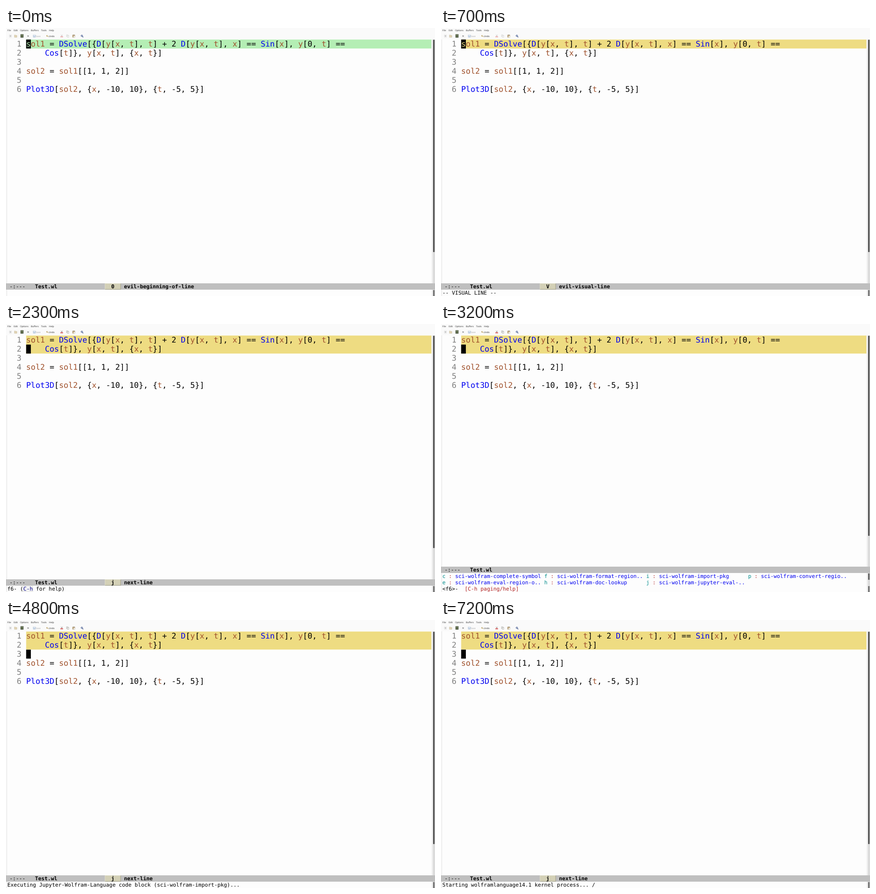
Animation of 947 by 592 pixels, one loop 8000 ms. Source, as an HTML page:

```html
<!DOCTYPE html>
<html lang="en">
<head>
<meta charset="utf-8">
<title>Editor session</title>
<style>
html, body { margin: 0; width: 100%; height: 100%; overflow: hidden; background: #fdfdfd; }
svg { display: block; width: 947px; height: 592px; }
text { white-space: pre; text-rendering: geometricPrecision; }
.code { font: 17.19px "DejaVu Sans Mono", monospace; }
.small { font: 11.68px "DejaVu Sans Mono", monospace; }
.menu { font: 5px "Noto Sans", sans-serif; }
.bold { font-weight: bold; }
</style>
</head>
<body>
<svg id="stage" viewBox="0 0 947 592"></svg>
<script>
const LOOP = 8000;
const CELL = 10.35, LEFT = 44.5, ROW = 20;
const SMALL = 7.032;
const BLUE = '#0000f0', BROWN = '#a0522d', TEAL = '#008b8b', RED = '#b22222';
const GREEN = '#b4eeb4', GOLD = '#eedc82';

const stage = document.getElementById('stage');

function add(parent, tag, attrs, content) {
  const el = document.createElementNS('http://www.w3.org/2000/svg', tag);
  for (const key in attrs) el.setAttribute(key, attrs[key]);
  if (content !== undefined) el.textContent = content;
  parent.appendChild(el);
  return el;
}
const group = (parent = stage) => add(parent, 'g', {});
const rect = (parent, x, y, width, height, fill, more) =>
  add(parent, 'rect', { x, y, width, height, fill, ...more });
const path = (parent, d, stroke, width = 1, fill = 'none') =>
  add(parent, 'path', { d, stroke, 'stroke-width': width, fill });
const label = (parent, cls, x, y, content, fill = '#000') =>
  add(parent, 'text', { class: cls, x, y, fill }, content);
const show = (el, on) => el.setAttribute('display', on ? 'inline' : 'none');

// Coloured runs of monospaced text: [string, colour]
function runs(parent, cls, x, y, parts) {
  const text = add(parent, 'text', { class: cls, x, y });
  for (const [str, fill] of parts) add(text, 'tspan', { fill: fill || '#000' }, str);
}

// Window frame
rect(stage, 0, 0, 947, 592, '#fdfdfd');
rect(stage, 0, 0, 947, 25, '#fafafa');
rect(stage, 0, 25, 3, 567, '#f2f2f2');
rect(stage, 939, 25, 3, 567, '#f3f3f3');
rect(stage, 942, 25, 5, 567, '#dcdcdc');

const menus = { File: 3, Edit: 17, Options: 31, Buffers: 55, Tools: 77.5, Help: 95 };
for (const name in menus) label(stage, 'menu', menus[name], 7, name, '#333');

// Toolbar
rect(stage, 7.8, 15.2, 4, 5.4, '#fff', { stroke: '#bbb', 'stroke-width': .5 });
path(stage, 'M9.8 16.6v2.4M8.6 17.8h2.4', '#777', .7);
path(stage, 'M18.7 15.4h2l.6.8h2.8v4.4h-5.4z', '#b9a882', .5, '#e3d5b6');
rect(stage, 32, 13.8, 6.6, 7.4, '#46513f', { rx: .5 });
rect(stage, 33, 14.8, 4.6, 1.5, '#8c9a70');
rect(stage, 33, 17.2, 4.6, 2.8, '#65734f');
path(stage, 'M47.2 16.2l3 3.2M50.2 16.2l-3 3.2', '#555', .9);
rect(stage, 60, 15.3, 5, 5, '#c4d3e6', { stroke: '#9fb2cb', 'stroke-width': .5 });
rect(stage, 61.2, 15.6, 2.6, 1.8, '#f4f7fb');
label(stage, 'menu', 65.5, 19.5, 'Save', '#aaa');
path(stage, 'M93.6 19.8q-.2-2.6-3.4-2.5M91.2 15.6l-2.2 1.8l2.2 1.5', '#a88a3c', .9);
label(stage, 'menu', 94.5, 19.5, 'Undo', '#333');

const clip = group();
path(clip, 'M121.4 14.8l2.6 4M124.8 14.8l-2.6 4', '#777', .7);
for (const x of [121.5, 124.5])
  add(clip, 'circle', { cx: x, cy: 19.4, r: 1, fill: 'none', stroke: '#d01818', 'stroke-width': 1 });
for (const [x, y] of [[133.5, 15], [135.4, 16.6]])
  rect(clip, x, y, 3.4, 4, '#f6f6f0', { stroke: '#999', 'stroke-width': .6 });

rect(stage, 147, 15.2, 5, 5.4, '#c6a878', { stroke: '#8d7650', 'stroke-width': .5 });
rect(stage, 148.6, 14.8, 2, 1, '#777');
rect(stage, 149, 17.2, 3.6, 3.4, '#f4f0e4', { stroke: '#aaa', 'stroke-width': .3 });
add(stage, 'circle', { cx: 167.4, cy: 17.2, r: 1.7, fill: '#dfe8f5', stroke: '#253c78', 'stroke-width': 1 });
path(stage, 'M168.7 18.6l1.8 1.9', '#253c78', 1.2);

// Buffer
const band = rect(stage, LEFT, 25.5, 894.5, 19.8, GREEN);
const source = [
  'sol1 = DSolve[{D[y[x, t], t] + 2 D[y[x, t], x] == Sin[x], y[0, t] ==',
  '    Cos[t]}, y[x, t], {x, t}]',
  '',
  'sol2 = sol1[[1, 1, 2]]',
  '',
  'Plot3D[sol2, {x, -10, 10}, {t, -5, 5}]'
];
const tint = word => /^[A-Z]/.test(word) ? BLUE : /^[a-z]/.test(word) ? BROWN : '#000';
source.forEach((line, i) => {
  const y = 41 + ROW * i;
  label(stage, 'code', LEFT - 2 * CELL, y, String(i + 1), '#7f7f7f');
  const words = line.match(/[A-Za-z]\w*|[^A-Za-z]+/g) || [];
  runs(stage, 'code', LEFT, y, words.map(w => [w, tint(w)]));
});
const cursor = rect(stage, LEFT, 25.5, CELL, 19.8, '#000');
const underCursor = label(stage, 'code', LEFT, 41, 's');
const thumb = rect(stage, 942.8, 26, 3.2, 469, '#505050', { rx: 1 });

// Mode line
const modeLine = group();
rect(modeLine, 0, 564, 947, 14, '#bfbfbf');
label(modeLine, 'small', 7.7, 575, '-:---');
label(modeLine, 'small bold', 64, 575, 'Test.wl');
const keyInfo = group(modeLine);
rect(keyInfo, 218.3, 564.3, 35.2, 13.4, '#d3d0b6');
path(keyInfo, 'M218.6 577.5V564.6H253.2', '#e6e4d2', .7);
path(keyInfo, 'M218.6 577.4H253.2V564.6', '#8f8d7b', .8);
const keyName = label(keyInfo, 'small bold', 218.3 + 2 * SMALL, 575, '');
const command = label(keyInfo, 'small bold', 260.5, 575, '');

// Echo area
rect(stage, 942.8, 579, 3.2, 13, '#707070');
const echo = label(stage, 'small', 3, 589, '');
const prefix = group();
rect(prefix, 38, 579, 3 * SMALL, 12.4, '#f4f4f4', { stroke: '#cfcfcf', 'stroke-width': .6 });
runs(prefix, 'small', 3, 589, [['f6- ('], ['C-h', '#00008b'], [' for help)']]);

// Key popup
const popup = group();
rect(popup, 3, 550, 936, 28, '#fdfdfd');
rect(popup, 942, 550, 5, 28, '#dcdcdc');
rect(popup, 942.8, 551, 3.2, 14, '#606060');
const bindings = [
  ['c complete-symbol', 'f format-region..', 'i import-pkg', 'p convert-regio..'],
  ['e eval-region-o..', 'h doc-lookup', 'j jupyter-eval-..']
];
bindings.forEach((row, r) => row.forEach((entry, c) => {
  const [key, name] = entry.split(' ');
  runs(popup, 'small', 3 + c * 32 * SMALL, 561 + 14 * r,
    [[key, TEAL], [' : ', RED], ['sci-wolfram-' + name, BLUE]]);
}));
const paging = group();
runs(paging, 'small', 3, 589, [['<f6>-  '], ['[C-h paging/help]', RED]]);

const VISUAL = '-- VISUAL LINE --';
const EXECUTING = 'Executing Jupyter-Wolfram-Language code block (sci-wolfram-import-pkg)...';
const STARTING = 'Starting wolframlanguage14.1 kernel process... ';

const at = { visual: 500, down: 1300, prefix: 2200, popup: 3200, run: 3800, close: 4700, kernel: 5000 };

function message(t) {
  if (t < at.visual) return '';
  if (t < at.prefix) return VISUAL;
  if (t < at.run) return '';
  if (t < at.kernel) return EXECUTING;
  return STARTING + (t < 5900 ? '\\' : t < 7000 ? '|' : '/');
}

function draw(t) {
  const visual = t >= at.visual, down = t >= at.down;
  const open = t >= at.popup && t < at.close;
  const line = t >= at.close ? 2 : down ? 1 : 0;
  const color = visual ? GOLD : GREEN;

  band.setAttribute('fill', color);
  band.setAttribute('height', down ? 39.8 : 19.8);
  cursor.setAttribute('y', 25.5 + ROW * line);
  show(cursor, t < at.run || t >= at.close);
  underCursor.setAttribute('fill', color);
  show(underCursor, !down);
  clip.setAttribute('opacity', down ? 1 : .5);

  thumb.setAttribute('height', open ? 442 : 469);
  modeLine.setAttribute('transform', `translate(0 ${open ? -28 : 0})`);
  show(keyInfo, !open);
  keyName.textContent = down ? 'j' : visual ? 'V' : '0';
  command.textContent = down ? 'next-line' : visual ? 'evil-visual-line' : 'evil-beginning-of-line';

  show(popup, open);
  show(prefix, t >= at.prefix && t < at.popup);
  show(paging, t >= at.popup && t < at.run);
  echo.textContent = message(t);
}

const start = performance.now();
function tick() {
  draw((performance.now() - start) % LOOP);
  requestAnimationFrame(tick);
}
draw(0);
requestAnimationFrame(tick);
</script>
</body>
</html>
```
